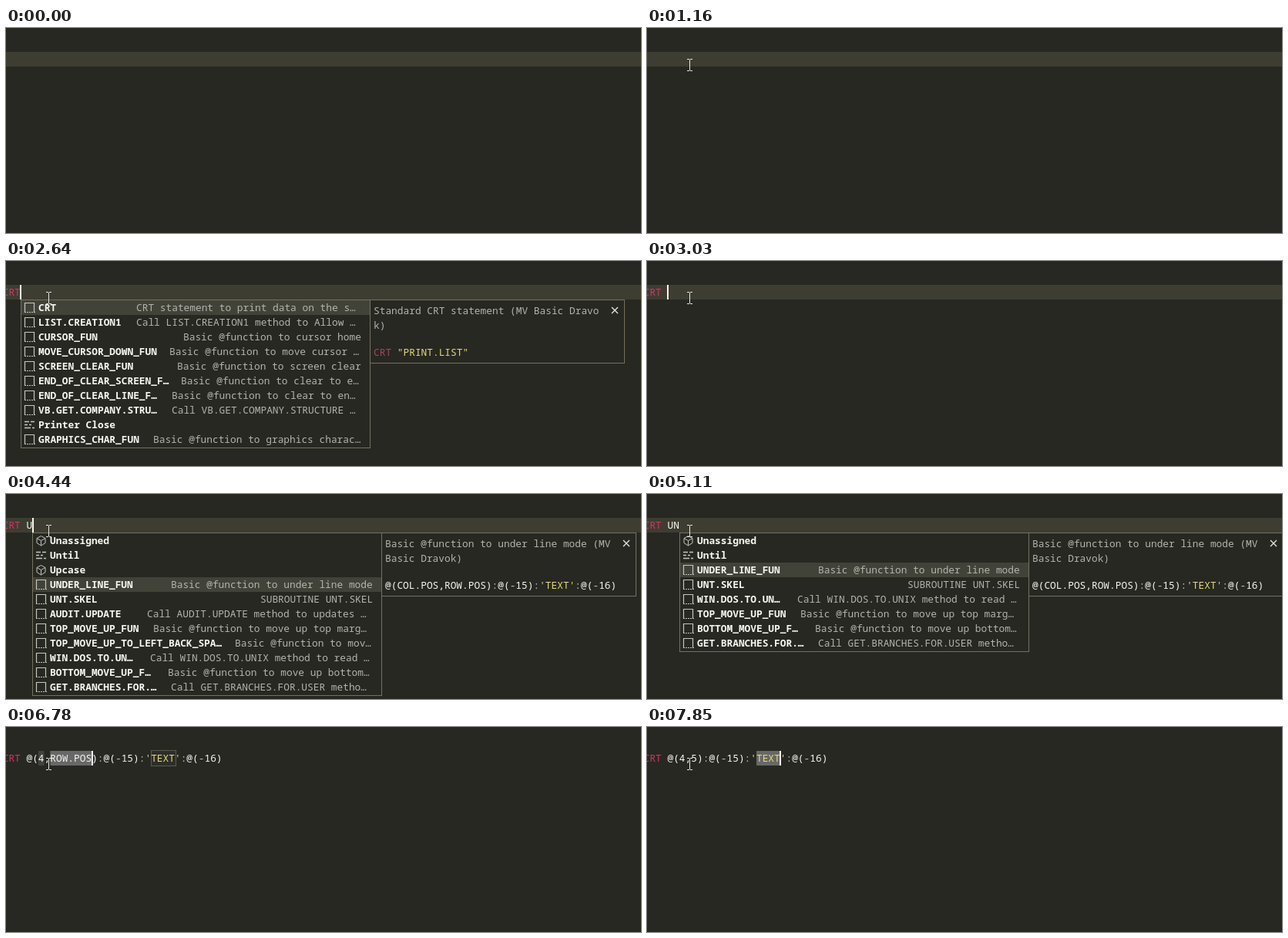
Recreate the animation shown at these times as an HTML page. Size 824x266 px, loop 8 s.

```html
<!DOCTYPE html>
<html lang="en">
<head>
<meta charset="utf-8">
<title>Code completion</title>
<style>
  html, body { margin: 0; width: 100%; height: 100%; overflow: hidden; background: #272822; }
  svg { display: block; }
  text { font: 500 12.83px "Noto Sans Mono", "DejaVu Sans Mono", monospace; white-space: pre; fill: #f8f8f2; }
  .label { font-weight: 600; }
  .note { fill: #b4b4ae; }
  .key { fill: #d23468; }
  .dimkey { fill: #a3485f; }
  .str { fill: #e6db74; }
  .op { fill: #c4bfc2; }
  .panel { fill: #272822; stroke: #75715e; }
  .icon { fill: none; stroke: #c5c5c0; }
</style>
</head>
<body>
<svg width="824" height="266" viewBox="0 0 824 266">
  <rect width="824" height="266" fill="#272822"/>
  <g id="scene"></g>
  <path id="mouse" d="M52 40.5h3M56 40.5h3M55.5 41v14M52 55.5h3M56 55.5h3" fill="none" stroke="#e8e8e4"/>
</svg>
<script>
const LOOP = 8000, CELL = 7.7, LEFT = -4.3, ROW = 19;
const scene = document.getElementById('scene');
const mouse = document.getElementById('mouse');

const colX = col => LEFT + col * CELL;
const rect = (x, y, w, h, attrs) => `<rect x="${x}" y="${y}" width="${w}" height="${h}" ${attrs}/>`;
const text = (x, y, cls, body) => `<text x="${x}" y="${y}" class="${cls}">${body}</text>`;

// [icon, label, note, note offset from the list's left edge]
const cRows = [
  ['s', 'CRT', 'CRT statement to print data on the s…', 150],
  ['s', 'CURSOR_FUN', 'Basic @function to cursor home', 211],
  ['m', 'End Case'],
  ['s', 'LIST.CREATION1', 'Call LIST.CREATION1 method to Allow …', 150],
  ['s', 'MOVE_CURSOR_DOWN_FUN', 'Basic @function to move cursor …', 193],
  ['k', 'Begin Case'],
  ['s', 'END_OF_CLEAR_LINE_F…', 'Basic @function to clear to en…', 196],
  ['s', 'END_OF_CLEAR_SCREEN_F…', 'Basic @function to clear to e…', 208],
  ['s', 'SCREEN_CLEAR_FUN', 'Basic @function to screen clear', 203],
  ['s', 'VB.GET.COMPANY.STRU…', 'Call VB.GET.COMPANY.STRUCTURE …', 196],
  ['k', 'Printer Close'],
  ['s', 'GRAPHICS_CHAR_FUN', 'Basic @function to graphics charac…', 172]
];
const uRows = [
  ['m', 'Unassigned'],
  ['k', 'Until'],
  ['m', 'Upcase'],
  ['s', 'UNDER_LINE_FUN', 'Basic @function to under line mode', 180],
  ['s', 'UNT.SKEL', 'SUBROUTINE UNT.SKEL', 296],
  ['s', 'AUDIT.UPDATE', 'Call AUDIT.UPDATE method to updates …', 149],
  ['s', 'TOP_MOVE_UP_FUN', 'Basic @function to move up top marg…', 157],
  ['s', 'TOP_MOVE_UP_TO_LEFT_BACK_SPA…', 'Basic @function to mov…', 263],
  ['s', 'WIN.DOS.TO.UN…', 'Call WIN.DOS.TO.UNIX method to read …', 153],
  ['s', 'BOTTOM_MOVE_UP_F…', 'Basic @function to move up bottom…', 176],
  ['s', 'GET.BRANCHES.FOR.…', 'Call GET.BRANCHES.FOR.USER metho…', 180]
];
const pick = (rows, order) => order.map(i => rows[i]);

const snippet = (col, row) => `@(${col},${row}):@(-15):'TEXT':@(-16)`;
const crtDoc = ['Standard CRT statement (MV Basic Dravo', 'k)', 'CRT "PRINT.LIST"'];
const lineDoc = ['Basic @function to under line mode (MV', 'Basic Dravok)', snippet('COL.POS', 'ROW.POS')];

const cList = { x: 4, rows: cRows, sel: 0, thumb: true };
const crList = { x: 12, rows: pick(cRows, [0, 1, 3, 4, 8, 7, 6, 9, 2, 5, 10, 11]), sel: 0, doc: crtDoc };
const crtList = { x: 19, rows: pick(cRows, [0, 3, 1, 4, 8, 7, 6, 9, 10, 11]), sel: 0, doc: crtDoc };
const uList = { x: 34, rows: uRows, sel: 3, doc: lineDoc };
const unList = { x: 42, rows: pick(uRows, [0, 1, 3, 4, 8, 6, 9, 10]), sel: 2, doc: lineDoc };

const full = 'CRT ' + snippet('COL.POS', 'ROW.POS');
const oneSet = 'CRT ' + snippet('4', 'ROW.POS');
const bothSet = 'CRT ' + snippet('4', '5');

// sel and marks are [column, length]; box is the outlined field
const first = { code: full, caret: 13, sel: [6, 7], marks: [[14, 7]], box: [31, 4] };
const second = { code: oneSet, caret: 15, sel: [8, 7], marks: [[6, 1]], box: [25, 4] };
const off = state => ({ ...state, blink: true });
const space = { code: 'CRT ', caret: 4 };
const un = { code: 'CRT UN', caret: 6, list: unList };

const steps = [
  [0, { code: '', caret: 0 }],
  [2150, { code: 'C', caret: 1 }],
  [2220, { code: 'C', caret: 1, list: cList }],
  [2300, { code: 'C', caret: 1, list: { ...cList, doc: crtDoc } }],
  [2420, { code: 'CR', caret: 2, list: crList }],
  [2640, { code: 'CRT', caret: 3, list: crtList }],
  [3030, space],
  [3520, off(space)],
  [3980, space],
  [4380, { code: 'CRT U', caret: 5 }],
  [4440, { code: 'CRT U', caret: 5, list: uList }],
  [4640, un],
  [5110, off(un)],
  [5440, first],
  [5920, off(first)],
  [6450, { code: oneSet, caret: 7, marks: [[6, 1], [8, 7]], box: [25, 4] }],
  [6780, second],
  [7250, off(second)],
  [7580, { code: bothSet, caret: 9, marks: [[6, 1], [8, 1]], box: [19, 4] }],
  [7850, { code: bothSet, caret: 23, sel: [19, 4] }]
];

function paint(code, key = 'key') {
  return code.replace(/CRT|'[^']*'|"[^"]*"|[:-]/g, part => {
    const cls = part === 'CRT' ? key : part.length > 1 ? 'str' : 'op';
    return `<tspan class="${cls}">${part}</tspan>`;
  });
}

const icons = {
  s: '<path class="icon" d="M.5 12.5V.5h12v12" stroke-width="1.2"/><path class="icon" d="M0 12.5h14" stroke-dasharray="2 1"/>',
  m: '<path class="icon" d="M6.5 .5l5.5 3v6l-5.5 3.5L1 9.500v-6zM1 3.500l5.500 3 5.500-3M6.500 6.500v6"/>',
  k: '<path class="icon" d="M0 2.500h6M8 2.500h5M0 6.500h4M6 6.500h3M0 10.500h8M10 10.500h3" stroke-width="1.400"/>'
};

function drawDoc(x, doc) {
  const tx = x + 458;
  return rect(x + 453.5, 50.5, 330, 82, 'class="panel"') +
    text(tx, 69, 'note', doc[0]) + text(tx, 88, 'note', doc[1]) +
    text(tx, 123, '', paint(doc[2], 'dimkey')) +
    `<path d="M${x + 767} 60l8 8m0-8l-8 8" stroke="#e8e8e2" stroke-width="1.3"/>`;
}

function drawList({ x, rows, sel, thumb, doc }) {
  let out = rect(x + .5, 50.5, 453, rows.length * ROW + 2, 'class="panel"');
  out += rect(x + 1, 51 + sel * ROW, 452, ROW, 'fill="#414339"');
  rows.forEach(([icon, label, note, offset], i) => {
    const y = 65 + i * ROW;
    out += `<g transform="translate(${x + 5} ${y - 11})">${icons[icon]}</g>` + text(x + 23, y, 'label', label);
    if (note) out += text(x + offset, y, 'note', note);
  });
  if (thumb) out += rect(x + 442, 172, 11, 66, 'fill="#797970" fill-opacity=".4"');
  return out + (doc ? drawDoc(x, doc) : '');
}

function draw({ code, caret, blink, sel, marks = [], box, list }) {
  const band = ([col, len], fill) => rect(colX(col), 31, len * CELL, 19, `fill="${fill}"`);
  let out = sel ? band(sel, '#686868') : rect(0, 31, 824, 19, 'fill="#3e3d32"');
  marks.forEach(m => out += band(m, '#42433f'));
  if (box) {
    out += rect(Math.floor(colX(box[0])) + .5, 30.5, 32, 20, 'fill="#2d2e28" stroke="#5a5b4e"');
  }
  out += text(LEFT, 45, '', paint(code));
  if (!blink) out += rect(Math.floor(colX(caret)), 31, 2, 19, 'fill="#f8f8f0"');
  return out + (list ? drawList(list) : '');
}

function moveMouse(t) {
  mouse.style.display = t < 340 ? 'none' : '';
  const p = Math.min(1, Math.max(0, Math.floor((t - 340) / 68) / 11));
  const far = 1 - p * p * (3 - 2 * p);
  mouse.setAttribute('transform', `translate(${Math.round(333 * far)} ${Math.round(102 * far)})`);
}

let shown = -1;
function update(now) {
  const t = now % LOOP;
  let i = steps.length - 1;
  while (steps[i][0] > t) i--;
  if (i !== shown) scene.innerHTML = draw(steps[shown = i][1]);
  moveMouse(t);
}

const start = performance.now();
function tick() {
  update(performance.now() - start);
  requestAnimationFrame(tick);
}
tick();
</script>
</body>
</html>
```
